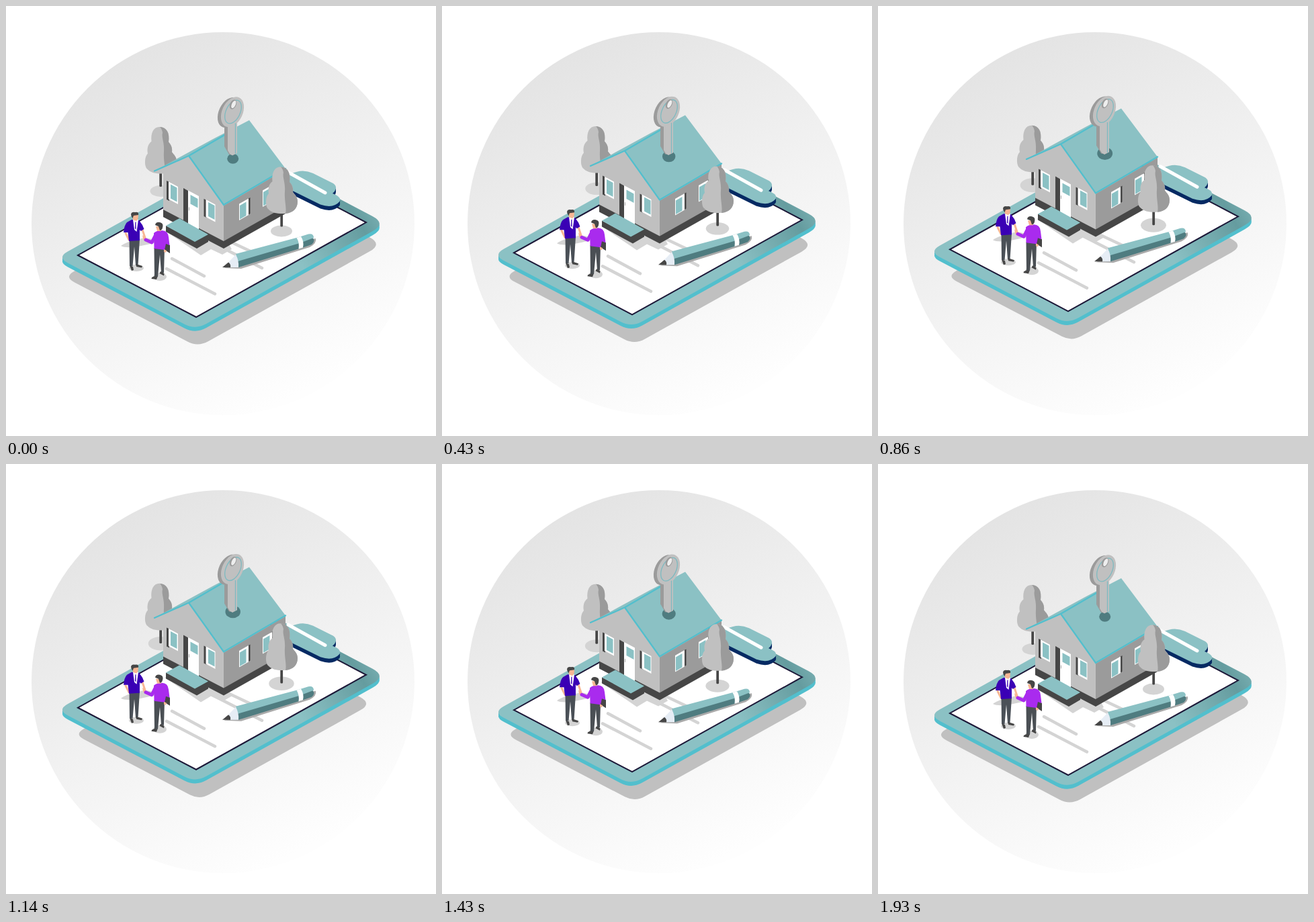
Write an HTML page that moves like this. It is 640 px wide and 640 px high and loops after 2000 ms.

```html
<!DOCTYPE html>
<html lang="en">
<head>
<meta charset="utf-8">
<title>House on a clipboard</title>
<style>
html, body { margin: 0; height: 100%; overflow: hidden; background: #fff; }
svg { display: block; width: 100%; height: 100%; }
.teal { fill: #8bc1c4; }
.deep { fill: #4f7c80; }
.light { fill: #c0c0c0; }
.mid { fill: #9b9b9b; }
.dark { fill: #464646; }
.white { fill: #fff; }
.shade { fill: #d4d4d4; }
.skin { fill: #f8b694; }
.line { fill: none; stroke-linecap: round; stroke-linejoin: round; }
</style>
</head>
<body>
<svg viewBox="0 0 640 640">
<defs>
  <linearGradient id="disc" gradientUnits="userSpaceOnUse" x1="190" y1="75" x2="440" y2="575">
    <stop offset="0" stop-color="#e4e4e4"/><stop offset="1" stop-color="#fefefe"/>
  </linearGradient>
  <linearGradient id="face" gradientUnits="userSpaceOnUse" x1="430" y1="370" x2="560" y2="290">
    <stop offset="0" stop-color="#8bc1c4"/><stop offset=".7" stop-color="#659c9f"/><stop offset="1" stop-color="#80b6b9"/>
  </linearGradient>
  <path id="slab" d="M92 382.600 L266 473.700 Q282 482 298 473.100 L546 335 Q566 323.800 545.600 313 L376 224 Q360 216 344 225 L91.700 365.500 Q76 374.300 92 382.600Z"/>
  <path id="grip" d="M400 263 L424 250 Q441 241.500 457 249 L487 264 Q494 269 489 276 L486 279 Q500 284 496.500 291 Q487 302 468 295.500 L400 262Z"/>
  <g id="tree">
    <rect class="dark" x="408.300" y="300" width="3.800" height="28.500" rx="1.500"/>
    <path class="light" d="M409 239.500 C400 239 395 248 396.500 261 C390 266 390 274 391 279 C386 284 386 296 389 301 C395 308 403 309 411 309 C425 309 434 302 434 291 C434 284 430 281 427 277 C428 270 425 265 422 262 C424 248 419 240 409 239.500Z"/>
    <path class="mid" d="M409 239.500 C419 240 424 248 422 262 C425 265 428 270 427 277 C430 281 434 284 434 291 C434 302 427 308 416 309 C418 300 414 290 415 276 C416 262 411 255 413 248 Q412 242 409 239.500Z"/>
  </g>
</defs>

<circle cx="323" cy="324" r="285" fill="url(#disc)"/>
<g id="shadow"><use href="#slab" transform="translate(12.700 41) scale(.968)" fill="#c0c0c0"/></g>

<g data-rise="9">
  <use href="#slab" y="6" fill="#52bfcd"/>
  <use href="#slab" y="3" fill="#52bfcd"/>
  <use href="#slab" fill="url(#face)"/>
  <path d="M107 371 L283 463 L536 322 L360 230Z" fill="#fff" stroke="#1c1838" stroke-width="2"/>
  <path class="line" stroke="#d4d4d4" stroke-width="4.500" d="M247 376 L295 402 M239 391 L311 428.500 M299 348 L381 390 M332 350 L366 366"/>
  <path class="shade" d="M171 357 Q182 349 208 345 L232 350 Q208 356 190 359 Q176 360 171 357Z"/>
  <ellipse class="shade" cx="194" cy="390" rx="11" ry="5"/>
  <ellipse class="shade" cx="229" cy="403" rx="10" ry="6"/>
  <use href="#grip" y="6" fill="#062a63"/>
  <use href="#grip" y="3" fill="#062a63"/>
  <use href="#grip" class="teal"/>
  <path class="line" stroke="#fff" stroke-width="5" d="M420 247.500 L475 278"/>
  <ellipse class="shade treeshade" cx="230.500" cy="275.500"/>
  <ellipse class="shade treeshade" cx="410" cy="335"/>
</g>

<g data-rise="2.3"><use href="#tree" x="-180" y="-59.500"/></g>

<g data-rise="18">
  <path class="shade" d="M236 334 L290 371 L305 362 L322 370 L336 362 L324 340Z"/>
  <path class="light" d="M234 240 L272 224 L324 297 V351 L234 304Z"/>
  <path class="mid" d="M324 297 L416 243 V299 L324 351Z"/>
  <path class="dark" d="M234 303 L324 350 L416 298 V309 L324 361 L234 314Z"/>
  <path class="teal" d="M220 246 L310 197 L362 170 L416 242 L324 296 L272 223Z"/>
  <path class="line" stroke="#52bfcd" stroke-width="2.300" d="M221 245.500 L272 223 L324 296 L416 242 M272 223 L326 191.500"/>
  <path class="dark" d="M239 260 l4 2 v28 l-4 -2Z M264 271 l7 4 v49 l-7 -4Z M294.500 287 l4 2 v26 l-4 -2Z M360 287 l3.500 -2 v24 l-3.500 2Z M394.500 267 l3.500 -2 v24 l-3.500 2Z"/>
  <path class="white" d="M242 261.500 l14 7.500 v26 l-14 -7.500Z M271 274.500 l16 8.500 v50 l-16 -8.500Z M297.500 288 l14 7.500 v26 l-14 -7.500Z M347 294.500 l14 -8 v24.500 l-14 8Z M382 274.500 l14 -8 v24.500 l-14 8Z"/>
  <path class="teal" d="M245 265.500 l9.500 5 v21 l-9.500 -5Z M274.500 281 l11 6 v13.500 l-11 -6Z M301 292 l9.500 5 v21 l-9.500 -5Z M348 297 l9.500 -5.500 v20.500 l-9.500 5.500Z M383 277 l9.500 -5.500 v20.500 l-9.500 5.500Z"/>
  <path class="line" stroke="#aaa" d="M272.500 300 v4"/>
  <path class="dark" d="M238 327 L281 350 L301 340 V351 L284 361 L238 336Z"/>
  <path class="teal" d="M238 327 L258 316 L301 340 L281 351Z"/>
</g>

<ellipse id="socket" class="deep" cx="337.700"/>
<g data-rise="1.5">
  <path class="mid" d="M325 172 H338 V222 L332 221 L325 209Z"/>
  <ellipse class="mid" cx="331.800" cy="158.500" rx="15" ry="23.800" transform="rotate(25 331.800 158.500)"/>
  <path class="light" d="M330 176 L344 172 V219 L337 222.500 L333 220 L330 215Z"/>
  <ellipse class="light" cx="337" cy="157.800" rx="15.300" ry="23.800" transform="rotate(25 337 157.800)"/>
  <ellipse class="line" cx="338" cy="157.500" rx="10.500" ry="18.500" transform="rotate(25 338 157.500)" stroke="#7dbac0" stroke-width="1.300"/>
  <path class="line" stroke="#7dbac0" stroke-width="1.300" d="M341.500 175 V219"/>
  <ellipse class="mid" cx="338" cy="146.500" rx="4.600" ry="7.500" transform="rotate(25 338 146.500)"/>
  <ellipse fill="#eee" cx="338.800" cy="146.500" rx="2.800" ry="6" transform="rotate(25 338.800 146.500)"/>
</g>

<g data-rise="2.3"><use href="#tree"/></g>

<g data-rise="9">
  <path fill="#aaa" d="M324 390 L350 391 L452 359 Q463 353 461 346 L440 350Z"/>
  <path class="deep" d="M343 378 L436 351 L455 344 Q462 349 455 355 L442 359.500 L346 389Z"/>
  <path class="teal" d="M342 369 L434 344.500 L450 339.500 Q458 338 458 345 L437 353 L345 380Z"/>
  <path class="white" d="M432.500 345 L439 343 Q444 351 442 359.500 L435.500 361.500 Q437 352 432.500 345Z"/>
  <path fill="#e6edf5" d="M342 370 L331 381.500 L334 389 L346 389 Q347 379 342 370Z"/>
  <path class="dark" d="M322 389 L331 381.500 Q335 384 334 389Z"/>

  <!-- man in blue -->
  <path class="line" stroke="#f8b694" stroke-width="3" d="M178 338 L183 348 M203 333 L207 345"/>
  <path fill="#4a5057" d="M183.500 347 H199 L196.500 386 H193 L191 358 L188.500 387 H184Z"/>
  <path class="dark" d="M184 386 L189 388 L190 393 L187 394Z M193.500 384 L203 387 L202 389.500 L194 388Z"/>
  <path fill="#3a00b5" d="M180 322 L187 318 L198 319 L203 326 L205.500 332 L200.500 335 L199 333 V349 L183 350 L181.500 337 L175 337 Q176 326 180 322Z"/>
  <path class="white" d="M189 318 L197 318 L194.500 336 L191 333Z"/>
  <path fill="#3a00b5" d="M192.300 322 L193.500 321 L193.500 333 L192 331Z"/>
  <path class="skin" d="M188 311 H197 L196.500 317 L194 320 L189 318Z"/>
  <path class="dark" d="M186 310 Q187 306 192 307 Q198 306 197 311 L190 312 L188.500 316 Q186 313 186 310Z"/>

  <!-- man in purple -->
  <path class="skin" d="M203 341 L209 346 L208 350 L204 347Z"/>
  <path fill="#4a4f54" d="M220.500 360 H236 L235 397 H231 L229 370 L226 403 H221Z"/>
  <path class="dark" d="M221 402 L225.500 403 L224 407 L216.500 406 L217 404Z M230 395 L235.500 398 L235 401.500 L228.500 398Z M236 352 L244 356 V368 L236 363Z"/>
  <path class="line" stroke="#a92bee" stroke-width="5" d="M222 342 L217 352 L208 348"/>
  <path fill="#a92bee" d="M220 338 Q224 334 232 334 Q241 334 242 344 L243.500 356 L238 354 L236 363 L220.500 361Z"/>
  <path class="skin" d="M223 328 H231 L231 335 L225 335Z M235 362 l4 2 -1 3 -3 -1Z"/>
  <path class="dark" d="M222 326 Q223 321 229 322 Q235 323 233 330 Q232 334 229 334 L227 328Z"/>
</g>
</svg>
<script>
const $ = id => document.getElementById(id);
const risers = document.querySelectorAll('[data-rise]');
const treeShades = document.querySelectorAll('.treeshade');

function setSize(el, rx, ry) {
  el.setAttribute('rx', rx);
  el.setAttribute('ry', ry);
}

function draw(now) {
  // 28 poses per 2 s loop; the last one equals the first
  const step = Math.floor(((now + 2) % 2000) * 14 / 1000);
  const p = (1 - Math.cos(2 * Math.PI * step / 27)) / 2;
  for (const el of risers) el.setAttribute('transform', `translate(0 ${-el.dataset.rise * p})`);
  $('shadow').setAttribute('transform', `translate(322.5 386) scale(${1 - .07 * p}) translate(-322.5 -386)`);
  for (const el of treeShades) setSize(el, 16 + 3 * p, 8.5 + 2 * p);
  $('socket').setAttribute('cy', 227.3 - 8 * p);
  setSize($('socket'), 8.5 + 3 * p, 7.5 + 2 * p);
}

const start = performance.now();
function tick() {
  draw(performance.now() - start);
  requestAnimationFrame(tick);
}
tick();
</script>
</body>
</html>
```
